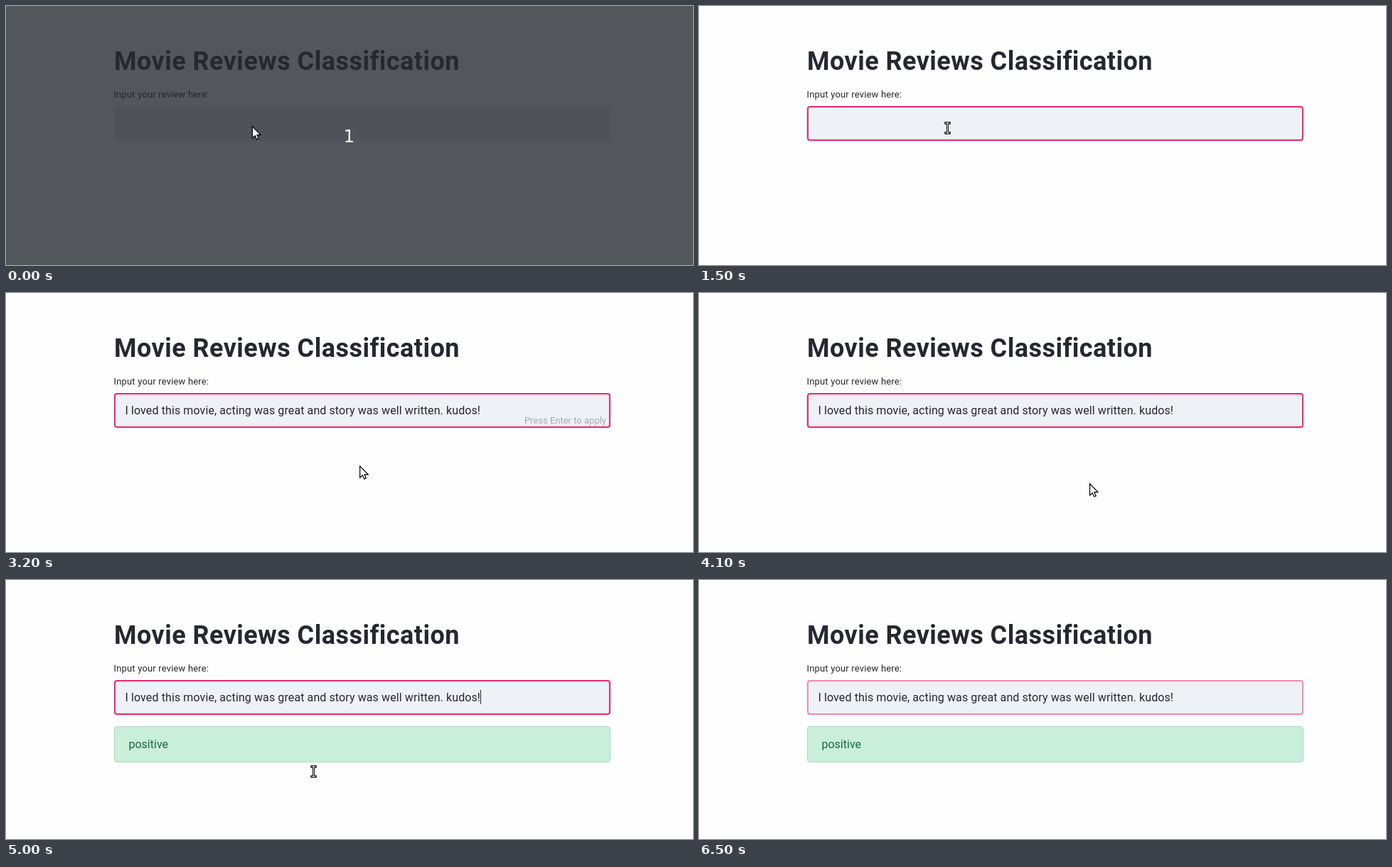
Write an HTML page that moves like this. It is 966x365 px and loops after 6600 ms.

```html
<!DOCTYPE html>
<html lang="en">
<head>
<meta charset="utf-8">
<title>Review form</title>
<style>
  html, body { margin: 0; width: 100%; height: 100%; overflow: hidden; background: #fefefe; }
  svg { display: block; width: 966px; height: 365px; }
  text { font: 16px Roboto, sans-serif; fill: #262730; }
  #title { font-size: 36px; font-weight: 700; letter-spacing: .46px; }
  #label { font-size: 13px; letter-spacing: .17px; }
  #review { letter-spacing: .1px; }
  #hint { font-size: 13px; fill: #a6a9b2; text-anchor: end; }
  #result text { fill: #176c3c; }
  #count text { font: 24px "DejaVu Sans", sans-serif; fill: #fff; text-anchor: middle; }
</style>
</head>
<body>
<svg viewBox="0 0 966 365">
  <text id="title" x="152" y="89.5">Movie Reviews Classification</text>
  <text id="label" x="151.5" y="129">Input your review here:</text>
  <rect x="152" y="141" width="698" height="49" rx="4" fill="#eef1f6"/>
  <rect id="focus" x="153" y="142" width="696" height="47" rx="3" fill="none" stroke="#f0266a" stroke-width="2"/>
  <text id="review" x="167.5" y="171">I loved this movie, acting was great and story was well written. kudos!</text>
  <text id="hint" x="844" y="184">Press Enter to apply</text>
  <rect id="caret" width="1" height="20" fill="#262730"/>
  <g id="result">
    <rect x="152.5" y="206.5" width="697" height="50" rx="3.5" fill="#c9eeda" stroke="#a9dcc0"/>
    <text x="172.5" y="237">positive</text>
  </g>
  <g id="count">
    <rect width="966" height="365" fill="#262930" opacity=".79"/>
    <text x="482.5" y="192">1</text>
  </g>
  <path id="arrow" d="M.5 .8V17.2L4.2 13.7L6.6 19L9.2 17.9L6.9 12.7H12Z" fill="#fff" stroke="#000" stroke-width="1.2"/>
  <g id="beam" fill="none" stroke-linecap="square">
    <path id="beamShape" d="M-2.5 -7H2.5M0 -7V7M-2.5 7H2.5" stroke="#000" stroke-width="3"/>
    <use href="#beamShape" style="stroke:#fff"/>
    <path d="M-2.5 -7H2.5M0 -7V7M-2.5 7H2.5" stroke="#fff" stroke-width="1"/>
  </g>
</svg>
<script>
const LOOP = 6600;
const el = id => document.getElementById(id);
const show = (id, on) => el(id).style.display = on ? '' : 'none';
const place = (id, x, y) => el(id).setAttribute('transform', `translate(${x} ${y})`);
const within = (t, [from, to]) => t >= from && t < to;

const caretOn = [[800, 1500], [2000, 2900], [3400, 4100], [4700, 5300], [5900, 6500]];

// The pointer glides from the field to the empty page in six steps.
const glide = Array.from({ length: 6 }, (_, i) => {
  const p = (i + 1) / 6, ease = p * p * (3 - 2 * p);
  const y = 172 + 96 * ease;
  return [2900 + i * 100, 349 + 200 * ease, y, y < 190 ? 'beam' : 'arrow'];
});

// time, x, y, shape; each entry holds until the next one
const pointer = [
  [0, 346, 169, 'arrow'],
  [400, 348.5, 172, 'beam'],
  [700, 349.5, 172, 'beam'],
  ...glide,
  [5000, 432.5, 270, 'beam'],
  [5100, 196, 91, 'beam'],
  [5300, 176, 39, 'arrow'],
  [5500, 150, 28, 'arrow'],
  [5600, 108, 14, 'arrow'],
  [5700, 60, 0, 'arrow'],
  [5800, 0, 0, 'none']
];

function draw(t) {
  const typed = t >= 2300;
  show('count', t < 400);
  show('review', typed);
  show('hint', within(t, [2300, 3700]));
  show('result', t >= 4400);
  show('caret', caretOn.some(span => within(t, span)));
  place('caret', typed ? 667 : 168, typed ? 155 : 156);

  const step = Math.floor(t / 100);
  el('focus').style.opacity = step >= 65 ? .5 : Math.max(0, Math.min(1, (step - 6) / 3));

  const [, x, y, shape] = pointer.findLast(entry => entry[0] <= t);
  for (const id of ['arrow', 'beam']) {
    show(id, id === shape);
    place(id, x, y);
  }
}

const start = performance.now();
function tick() {
  draw((performance.now() - start) % LOOP);
  requestAnimationFrame(tick);
}
tick();
</script>
</body>
</html>
```
